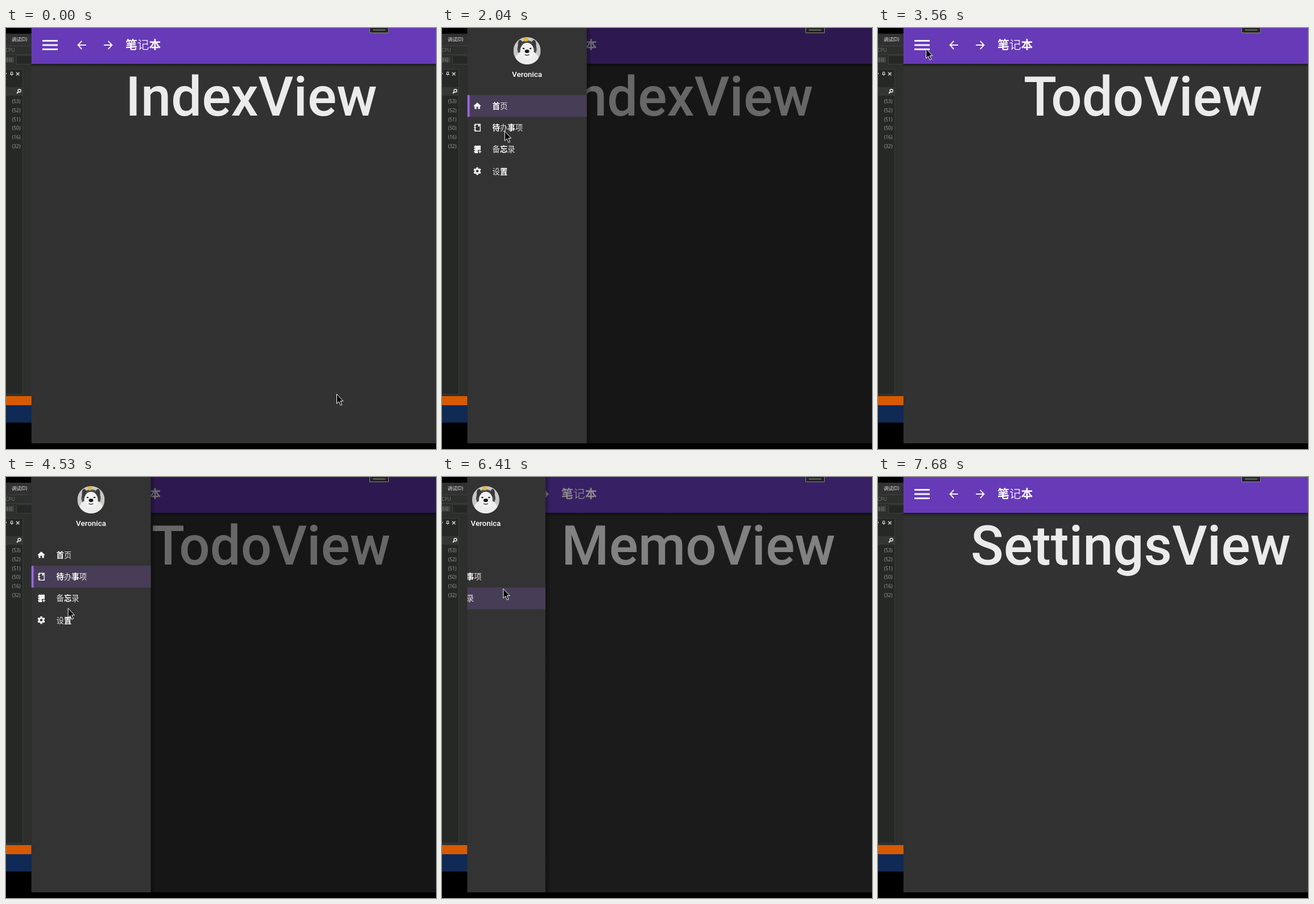
An HTML page with a canvas for the animation above (8.01 s loop, 756 by 740 pixels).

```html
<!DOCTYPE html>
<html lang="zh-CN">
<head>
<meta charset="utf-8">
<title>笔记本</title>
<style>
html, body { margin: 0; width: 100%; height: 100%; overflow: hidden; background: #000; }
canvas { display: block; }
</style>
</head>
<body>
<canvas id="stage" width="756" height="740"></canvas>
<script>
const ctx = document.getElementById('stage').getContext('2d');
const LOOP = 8010, LEFT = 44.5, WIDTH = 712, BOTTOM = 730;
const DRAWER = 210, ROW = 38.2, FIRST_ROW = 137;
const CJK = '"Noto Sans CJK SC", "Noto Sans CJK", sans-serif';
const ROBOTO = 'Roboto, sans-serif';
const UI = '"Open Sans", "Noto Sans", "Noto Sans CJK SC", sans-serif';

// Each page: its ink edge, and when the drawer opens and closes on it.
// Asterisks in labels precede the heavy characters.
const pages = [
  { name: 'IndexView', label: '*首页', ink: 217, open: 1563, close: 2488 },
  { name: 'TodoView', label: '*待办*事项', ink: 258, open: 3600, close: 5198 },
  { name: 'MemoView', label: '备*忘录', ink: 216, open: 6170, close: 7000 },
  { name: 'SettingsView', label: '设*置', ink: 166, open: LOOP, close: LOOP }
];
const visits = pages.slice(0, -1);
const SELECT_LEAD = 70;

const sine = v => (1 - Math.cos(Math.PI * Math.max(0, Math.min(1, v)))) / 2;
const ramp = (t, from, duration) => sine((t - from) / duration);
const mix = (a, b, p) => a.map((v, i) => v + (b[i] - v) * p);

function rect(color, x, y, w, h) {
  ctx.fillStyle = color;
  ctx.fillRect(x, y, w, h);
}

function disc(color, x, y, rx, ry = rx) {
  ctx.fillStyle = color;
  ctx.beginPath();
  ctx.ellipse(x, y, rx, ry, 0, 0, 7);
  ctx.fill();
}

function ring(color, width, x, y, r) {
  ctx.strokeStyle = color;
  ctx.lineWidth = width;
  ctx.beginPath();
  ctx.arc(x, y, r, 0, 7);
  ctx.stroke();
}

function line(color, width, ...points) {
  ctx.strokeStyle = color;
  ctx.lineWidth = width;
  ctx.beginPath();
  for (let i = 0; i < points.length; i += 2) ctx.lineTo(points[i], points[i + 1]);
  ctx.stroke();
}

function at(x, y, paint) {
  ctx.save();
  ctx.translate(x, y);
  paint();
  ctx.restore();
}

function text(str, x, y, font, color, align = 'left') {
  ctx.font = font;
  ctx.fillStyle = color;
  ctx.textAlign = align;
  ctx.fillText(str, x, y);
}

function mixedText(str, x, y, size) {
  for (const [part] of str.matchAll(/\*?[^*]/g)) {
    const heavy = part.length > 1;
    text(part.at(-1), x, y, `${heavy ? 700 : 300} ${size}px ${CJK}`,
      heavy ? '#fff' : 'rgba(255,255,255,.85)');
    x += size;
  }
}

function shadow(x, y, w, h, dx, dy, alpha) {
  const g = ctx.createLinearGradient(x, y, x + dx, y + dy);
  g.addColorStop(0, `rgba(0,0,0,${alpha})`);
  g.addColorStop(1, 'rgba(0,0,0,0)');
  rect(g, x, y, w, h);
}

function arrow(x, y, dir) {
  at(x, y, () => {
    ctx.scale(dir, 1);
    line('#f4f4f4', 2, -7, 0, 8, 0);
    line('#f4f4f4', 2, 0.5, -7.2, 7, 0, 0.5, 7.2);
  });
}

function home() {
  ctx.fillStyle = '#f4f4f4';
  ctx.beginPath();
  ctx.moveTo(0, -6);
  ctx.lineTo(7, 0.3);
  ctx.lineTo(-7, 0.3);
  ctx.fill();
  for (const x of [-4.7, 1.4]) rect('#f4f4f4', x, 0, 3.3, 5.4);
  rect('#f4f4f4', -4.7, 0, 9, 1.4);
}

function book(plus) {
  line('#f4f4f4', 1.4, -4, -6, 5.3, -6, 5.3, 6, -4, 6, -4, -6.7);
  for (const y of [-4, 0, 4]) rect('#f4f4f4', -6, y - .7, 4, 1.4);
  if (plus) {
    rect('#f4f4f4', -3, -6, 8, 8);
    rect('#f4f4f4', -3, 2, 4, 4);
    rect('#333', 1.5, 1, 6, 7);
    line('#f4f4f4', 1.4, 1.8, 4, 7.2, 4);
    line('#f4f4f4', 1.4, 4.5, 1.3, 4.5, 6.7);
  } else rect('#f4f4f4', 1.5, -6, 2.5, 4);
}

function cog() {
  for (let i = 0; i < 6; i++) {
    rect('#f4f4f4', -1.7, -6.7, 3.4, 4);
    ctx.rotate(Math.PI / 3);
  }
  ring('#f4f4f4', 2.9, 0, 0, 3.7);
}

const icons = [home, () => book(false), () => book(true), cog];

// Sum of all openings minus all closings up to now, from 0 to 1.
const openness = (t, opening, closing) => visits.reduce((sum, v) =>
  sum + ramp(t, v.open, opening) - ramp(t, v.close, closing), 0);

function cursorAt(t) {
  const burger = [84, 36], exit = [130, 745];
  let pos = mix([581, 643], burger, ramp(t, 0, 770));
  visits.forEach(({ open, close }, i) => {
    const drift = 12 * (1 - ramp(t, close - 700, 300));
    const row = [(i % 2 ? 97 : 109) + drift, FIRST_ROW + ROW * (i + 1) + 5 + drift];
    const leave = close + 200;
    const back = i < visits.length - 1 ? burger : exit;
    const arrive = back === exit ? 7660 : pages[i + 1].open - 60;
    pos = mix(pos, row, ramp(t, open + 70, 270));
    pos = mix(pos, back, ramp(t, leave, arrive - leave));
  });
  return pos;
}

function drawEditor() {
  rect('#000', 0, 0, 756, 740);
  rect('#2d2f2d', 0, 10, 45, 637);
  rect('#303130', 0, 10, 45, 21);
  for (const y of [31.5, 46.5]) line('#404240', 1, 0, y, 45, y);
  text('调试(D)', 10, 23, `8.2px ${UI}`, '#eee');
  text('CPU', -1, 42, `8.5px ${UI}`, '#777');
  rect('#383a38', 0, 51, 14, 10);
  text('线程:', -3, 59, `7.5px ${UI}`, '#777');
  rect('#252725', 18, 48, 27, 15);
  line('#3c3e3c', 1, 45, 48.5, 18.5, 48.5, 18.5, 63.5, 45, 63.5);

  rect('#262826', 0, 72, 29, 571);
  line('#3b3d3b', 1, 0, 72.5, 29.5, 72.5, 29.5, 643.5, 0, 643.5);
  rect('#ddd', 0, 79, 1, 2);
  line('#ddd', 1, 8.5, 81, 8.5, 77.5, 11.5, 77.5, 11.5, 81);
  line('#ddd', 1, 7, 81.5, 13, 81.5);
  line('#ddd', 1, 10, 81, 10, 84);
  for (const s of [-1, 1]) line('#eee', 1.2, 18, 80.7 - s * 2.7, 23.5, 80.7 + s * 2.7);
  rect('#343634', 0, 104, 29, 15);
  line('#eee', 1.8, 19, 115, 22, 112);
  ring('#eee', 1.4, 23.5, 110.3, 2.5);
  [53, 52, 51, 50, 16, 32].forEach((n, i) =>
    text(`(${n})`, 25.5, 132 + i * 15.8, `8.5px ${UI}`, '#a0a0a0', 'right'));

  rect('#d75a00', 0, 647, 45, 16);
  rect('#102a56', 0, 663, 45, 30.5);
}

function drawPage(page, open) {
  rect('#323232', LEFT, 0, WIDTH, BOTTOM);
  rect('#673ab7', LEFT, 0, WIDTH, 63);
  shadow(LEFT, 63, WIDTH, 6, 0, 6, .45);
  at(77.5, 30, () => {
    ctx.rotate(-Math.PI * .75 * open);
    for (const y of [-7.5, 0, 7.5]) rect('#f4f4f4', -13.5, y - 1.5, 27, 3);
  });
  arrow(133.7, 30, -1);
  arrow(179.2, 30, 1);
  mixedText('*笔记*本', 210, 37, 20.8);

  ctx.font = `500 95.6px ${ROBOTO}`;
  ctx.textAlign = 'left';
  const overhang = ctx.measureText(page.name).actualBoundingBoxLeft;
  text(page.name, page.ink + overhang, 154, ctx.font, '#ebebeb');
}

function avatar() {
  ctx.beginPath();
  ctx.arc(0, 0, 24, 0, 7);
  ctx.clip();
  rect('#c9c7c4', -24, -24, 48, 48);
  disc('#4a4a4a', 0, -3, 17, 15);
  for (const side of [-1, 1]) disc('#3a3a3a', side * 12, -11, 4, 8);
  disc('#ececec', 0, 14, 20, 15);
  disc('#f2f2f2', 0, 0, 12, 14);
  for (const side of [-1, 1]) disc('#222', side * 6, -4, 1.8, 1.2);
  disc('#161616', 0, 1, 4, 3);
  line('#444', 1.3, -4, 7, 0, 8, 4, 7);
  disc('#e1b92c', -2, -20, 4, 3.5);
}

function drawDrawer(selected, open) {
  if (open < .001) return;
  at(LEFT + DRAWER * (open - 1), 0, () => {
    ctx.globalAlpha = Math.min(1, open * 8);
    shadow(DRAWER, 0, 9, BOTTOM, 9, 0, .35);
    rect('#333', 0, 0, DRAWER, BOTTOM);
    at(105, 40, avatar);
    text('Veronica', 105, 86, `500 13.4px ${ROBOTO}`, '#fff', 'center');
    const top = FIRST_ROW - ROW / 2 + selected * ROW;
    rect('#483d56', 0, top, DRAWER, ROW);
    rect('#9b69e3', 0, top, 4, ROW);
    pages.forEach(({ label }, i) => {
      const y = FIRST_ROW + i * ROW;
      at(17.5, y, icons[i]);
      mixedText(label, 44, y + 5, 13.4);
    });
  });
}

function cursor() {
  ctx.beginPath();
  ctx.moveTo(.5, .5);
  ctx.lineTo(.5, 17.2);
  ctx.lineTo(4.3, 13.6);
  ctx.lineTo(7.2, 20.2);
  ctx.lineTo(9.8, 19.1);
  ctx.lineTo(7, 12.7);
  ctx.lineTo(11.9, 12.7);
  ctx.closePath();
  ctx.fillStyle = '#000';
  ctx.fill();
  ctx.strokeStyle = '#fff';
  ctx.lineWidth = 1;
  ctx.stroke();
}

function draw(t) {
  const selected = visits.filter(v => v.close - SELECT_LEAD <= t).length;
  const open = openness(t, 400, 300), dim = openness(t, 335, 310);
  drawEditor();
  ctx.save();
  ctx.beginPath();
  ctx.rect(LEFT, 0, WIDTH, BOTTOM);
  ctx.clip();
  drawPage(pages[selected], open);
  rect(`rgba(0,0,0,${.56 * dim})`, LEFT, 0, WIDTH, BOTTOM);
  drawDrawer(selected, open);
  ctx.restore();

  rect('#222', 639, 0, 34, 9);
  line('#8a8a80', 1, 639.5, 0, 639.5, 8.5, 672.5, 8.5, 672.5, 0);
  rect('#555', 645, 2, 22, 3);
  at(...cursorAt(t), cursor);
}

let start;
function frame(now) {
  start ??= now;
  draw((now - start) % LOOP);
  requestAnimationFrame(frame);
}
requestAnimationFrame(frame);
</script>
</body>
</html>
```
